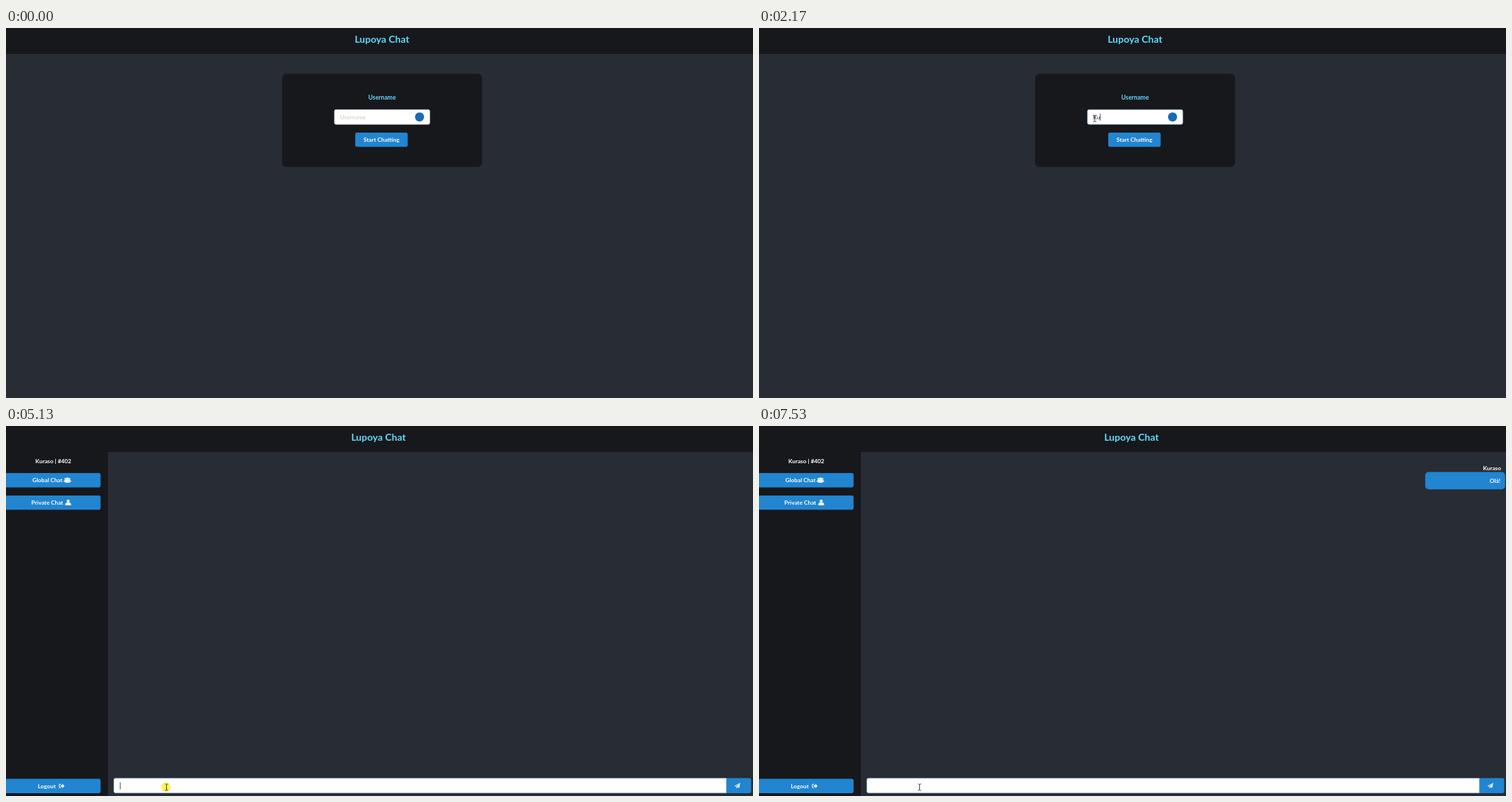
Write an HTML page that moves like this. It is 1063 by 527 pixels and loops after 8 s.

```html
<!DOCTYPE html>
<html lang="en">
<head>
<meta charset="utf-8">
<title>Lupoya Chat</title>
<style>
  html, body { margin: 0; width: 100%; height: 100%; overflow: hidden; background: #282c34; }
  svg { display: block; width: 1063px; height: 527px; font: 8.25px Lato, sans-serif; }
  .dark { fill: #17181c; }
  .blue { fill: #2185d0; }
  .field { fill: #fff; stroke: #dedede; stroke-width: .6; }
  .field.focus { stroke: #85b7d9; }
  .bold { font-weight: 700; fill: #fff; }
  .mid { text-anchor: middle; }
  .end { text-anchor: end; }
  .cyan { fill: #61dafb; }
  .typed { fill: #3a3a3a; }
  .hint { fill: #c8c8c8; }
  .icon { fill: #fff; opacity: .9; }
</style>
</head>
<body>
<svg viewBox="0 0 1063 527">
  <rect width="1063" height="527" fill="#282c34"/>
  <rect class="dark" width="1063" height="37"/>
  <text id="title" class="bold cyan mid" y="21.4" font-size="14">Lupoya Chat</text>

  <g id="login">
    <rect class="dark" x="393" y="65.3" width="284.3" height="132.4" rx="5.5"/>
    <text class="bold cyan mid" x="535.2" y="102" font-size="8.7">Username</text>
    <rect id="nameField" class="field" x="467.3" y="116.3" width="135.8" height="21" rx="2.4"/>
    <text id="hint" class="hint" x="475.5" y="130.1">Username</text>
    <text id="name" class="typed" x="475.5" y="130.1"></text>
    <circle cx="588.5" cy="126.7" r="6.5" fill="#1a6bb5"/>
    <rect class="blue" x="497" y="149" width="74.6" height="20.3" rx="2.4"/>
    <text class="bold mid" x="534.3" y="161.9">Start Chatting</text>
  </g>

  <g id="chat">
    <rect class="dark" y="36" width="145" height="491"/>
    <text class="bold mid" x="67.3" y="53.3">Kuraso | #402</text>
    <g class="blue">
      <rect x="-1" y="67" width="135.6" height="20.4" rx="2.4"/>
      <rect x="-1" y="98.9" width="135.6" height="20.4" rx="2.4"/>
      <rect x="-1" y="502.6" width="135.6" height="20.4" rx="2.4"/>
      <path d="M1025 501.4h33a2.4 2.4 0 0 1 2.4 2.4v16.8a2.4 2.4 0 0 1-2.4 2.4h-33z"/>
    </g>
    <text class="bold" x="37.5" y="80">Global Chat</text>
    <text class="bold" x="36" y="111.9">Private Chat</text>
    <text class="bold" x="45.3" y="515.7">Logout</text>
    <g class="icon">
      <circle cx="84.6" cy="75.5" r="1.4"/>
      <circle cx="90.2" cy="75.5" r="1.4"/>
      <path d="M82.2 79.5v-1q0-1.5 1.7-1.5h7q1.7 0 1.7 1.5v1z"/>
      <circle cx="87.4" cy="75.3" r="2.1"/>
      <path d="M84.1 80.8v-1.3q0-2 2-2h2.6q2 0 2 2v1.3z"/>
      <circle cx="88.5" cy="107" r="2.2"/>
      <path d="M84.4 113.1v-1.5q0-2.6 2.5-2.6h3.2q2.5 0 2.5 2.6v1.5z"/>
      <path d="M78.3 509.8h-1.6q-1.4 0-1.4 1.4v3.2q0 1.4 1.4 1.4h1.6v-1h-1.3q-.6 0-.6-.6v-2.8q0-.6.6-.6h1.3zM77.9 511.6h2.3v-2l3.2 3.2-3.2 3.2v-2h-2.3z"/>
      <path d="M1044.9 508.2l-1.5 7.4-2.9-1.2-1.4 2v-2.5l4.4-4.3-5.3 3.9-1.8-.8z"/>
    </g>
    <path id="chatField" class="field" d="M1025 501.7H155.8a2.4 2.4 0 0 0-2.4 2.4v16.2a2.4 2.4 0 0 0 2.4 2.4H1025z"/>
    <text id="draft" class="typed" x="162.2" y="515.5"></text>
    <g id="message">
      <text class="bold end" x="1056" y="62.5">Kuraso</text>
      <rect class="blue" x="948" y="65.5" width="113.8" height="24.7" rx="5"/>
      <text class="bold end" x="1055" y="80.5">Olá!</text>
    </g>
  </g>

  <rect id="caret" width=".8" height="10" fill="#333"/>
  <g id="pointer">
    <circle id="click" cx="-.8" cy="-.2" r="6.6" fill="#fff23a" opacity=".85"/>
    <path id="arrow" d="M0 0v8.8l2.1-1.9 1.4 3.1 1.5-.7-1.4-3h2.7z" fill="#fff" stroke="#14151a" stroke-width=".6"/>
    <path id="beam" d="M-2.3-4.5h1.6l.7.6.7-.6h1.6M-2.3 4.5h1.6l.7-.6.7.6h1.6M0-3.9v7.8" fill="none" stroke="#333" stroke-width=".9"/>
  </g>
</svg>
<script>
const LOOP = 8000, CHAT = 3580, SENT = 7260;
const $ = id => document.getElementById(id);
const show = (id, on) => $(id).style.display = on ? '' : 'none';
const within = (t, ...spans) => spans.some(([a, b]) => t >= a && t < b);
const typed = (word, times, t) => word.slice(0, times.filter(at => t >= at).length);

// Pointer path: time, x, y
const path = [
  [70, 995, 520], [820, 382, 231], [890, 390, 222], [1100, 477.8, 128.7],
  [4310, 477.8, 128.7], [4590, 266, 516], [4720, 266, 516], [5060, 228.5, 514.5]
];

function pointerAt(t) {
  const i = path.findIndex(p => p[0] > t);
  if (i < 0) return path[path.length - 1].slice(1);
  if (i === 0) return path[0].slice(1);
  const [a, b] = [path[i - 1], path[i]];
  const u = (t - a[0]) / (b[0] - a[0]);
  const k = u * (2 - u);
  return [a[1] + (b[1] - a[1]) * k, a[2] + (b[2] - a[2]) * k];
}

function draw(t) {
  const chat = t >= CHAT;
  show('login', !chat);
  show('chat', chat);
  $('title').setAttribute('x', chat ? 530 : 535);

  $('name').textContent = typed('Kuraso', [1970, 2170, 2370, 2520, 2720, 2850], t);
  show('hint', t < 1970);
  $('draft').textContent = t < SENT ? typed('Olá!', [5740, 5940, 6470, 7000], t) : '';
  show('message', t >= 7460);
  $('nameField').classList.toggle('focus', t >= 1370);
  $('chatField').classList.toggle('focus', t >= 5130);

  const text = $(chat ? 'draft' : 'name');
  const width = text.textContent ? text.getComputedTextLength() : 0;
  $('caret').setAttribute('x', +text.getAttribute('x') + width - .2);
  $('caret').setAttribute('y', chat ? 507.5 : 122);
  show('caret', within(t, [1370, 1900], [1970, 3380], [5130, 5670], [5740, 7530]));

  const [x, y] = pointerAt(t);
  const overField = chat ? y > 501 : x > 467 && x < 603 && y > 116 && y < 138;
  $('pointer').setAttribute('transform', `translate(${x} ${y})`);
  show('pointer', t >= 70);
  show('arrow', !overField);
  show('beam', overField);
  show('click', within(t, [1300, 1440], [5130, 5270]));
}

const start = performance.now();
function tick() {
  draw((performance.now() - start) % LOOP);
  requestAnimationFrame(tick);
}
tick();
</script>
</body>
</html>
```
